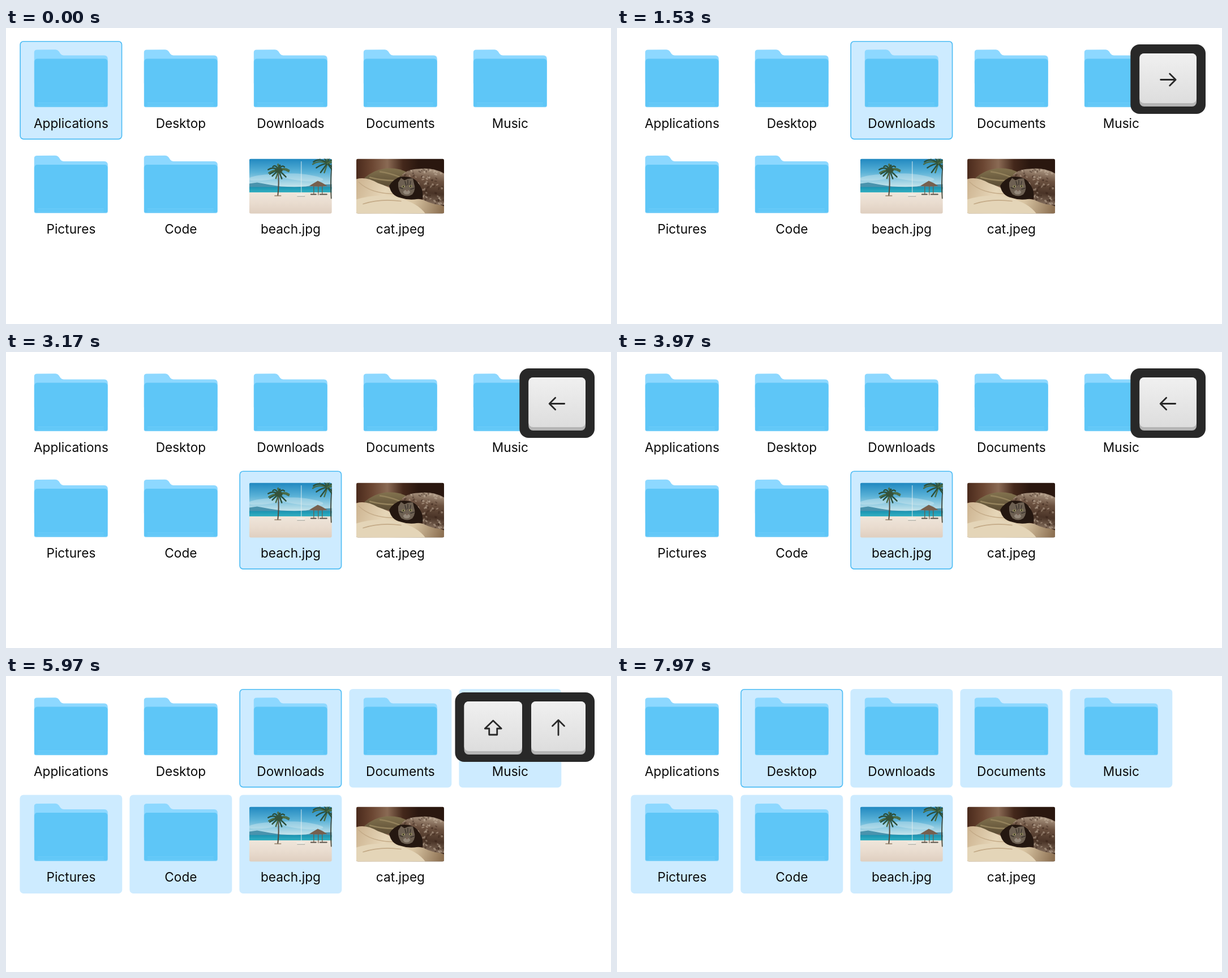
These frames come from a looping animation (1069x524 px, 8000 ms). An HTML page with a canvas:

```html
<!DOCTYPE html>
<html lang="en">
<head>
<meta charset="utf-8">
<title>File grid keyboard navigation</title>
<style>
  html, body { margin: 0; width: 100%; height: 100%; overflow: hidden; background: #fff; }
  canvas { display: block; width: 1069px; height: 524px; }
</style>
</head>
<body>
<canvas id="stage"></canvas>
<script>
const W = 1069, H = 524, LOOP = 8000;
const canvas = document.getElementById('stage');
const dpr = window.devicePixelRatio || 1;
canvas.width = W * dpr;
canvas.height = H * dpr;
const ctx = canvas.getContext('2d');

const COLS = 5, PITCH_X = 194, PITCH_Y = 187.5;
const names = ['Applications', 'Desktop', 'Downloads', 'Documents', 'Music',
  'Pictures', 'Code', 'beach.jpg', 'cat.jpeg'];

// Each step: start time, focused item, end of selection, keys on show
const steps = [
  [0, 0, 0, ''],
  [470, 1, 1, '→'],
  [1130, 2, 2, '→'],
  [1800, 3, 3, '→'],
  [2360, 8, 8, '↓'],
  [3030, 7, 7, '←'],
  [4500, 7, 7, '⇧'],
  [5400, 2, 7, '⇧↑'],
  [6270, 1, 7, '⇧←']
];
const FADE_START = 7200, FADE_TIME = 200;

function rounded(x, y, w, h, r, fill) {
  ctx.beginPath();
  ctx.roundRect(x, y, w, h, r);
  if (fill) {
    ctx.fillStyle = fill;
    ctx.fill();
  }
}

function shape(d, fill) {
  ctx.fillStyle = fill;
  ctx.fill(new Path2D(d));
}

function line(d, color, width) {
  ctx.strokeStyle = color;
  ctx.lineWidth = width;
  ctx.stroke(new Path2D(d));
}

function ellipse(x, y, rx, ry, fill, turn = 0) {
  ctx.beginPath();
  ctx.ellipse(x, y, rx, ry, turn, 0, Math.PI * 2);
  ctx.fillStyle = fill;
  ctx.fill();
}

function gradient(x0, y0, x1, y1, ...colors) {
  const g = ctx.createLinearGradient(x0, y0, x1, y1);
  colors.forEach((c, i) => g.addColorStop(i / (colors.length - 1), c));
  return g;
}

const vertical = (y0, y1, ...colors) => gradient(0, y0, 0, y1, ...colors);

function seeded(seed) {
  return () => (seed = (seed * 16807) % 2147483647) / 2147483647;
}

function at(x, y, draw) {
  ctx.save();
  ctx.translate(x, y);
  draw();
  ctx.restore();
}

function folder() {
  shape('M0 5Q0 .8 5 .6L37 .2Q41 0 43.5 3.2L46.5 7.8Q48.5 10.4 52 10.4H124' +
    'Q130 10.4 130 17V60H0Z', '#8dd8ff');
  rounded(0, 16.5, 130, 85.8, [5, 5, 3, 3], '#8ad5fa');
  rounded(0.4, 16.5, 129.2, 84.8, [5, 5, 3, 3], '#5ec6f7');
  ctx.fillStyle = 'rgba(150,220,252,.38)';
  ctx.fillRect(6, 94.3, 117, 1);
  ctx.fillRect(6, 98.2, 117, 1);
}

function palm(x, y, size, count, seed) {
  const rnd = seeded(seed);
  for (let i = 0; i < count; i++) {
    const a = i / count * Math.PI * 2 + rnd() * 0.4;
    const len = size * (0.75 + rnd() * 0.25);
    const ex = x + Math.cos(a) * len;
    const ey = y + Math.sin(a) * len * 0.6 + len * 0.15;
    const mx = x + Math.cos(a) * len * 0.55;
    const my = y + Math.sin(a) * len * 0.6 - len * 0.15;
    line(`M${x} ${y}Q${mx} ${my} ${ex} ${ey}`, i % 3 ? '#2c4f3a' : '#4a6b45', 2.4);
  }
}

function beach() {
  rounded(0, 0, 146, 97, 3.2);
  ctx.clip();
  ctx.fillStyle = vertical(0, 48, '#2088c0', '#5bb2d7', '#bfe1ea');
  ctx.fillRect(0, 0, 146, 52);
  ctx.globalAlpha = 0.35;
  ellipse(28, 33, 31, 5, '#e2f1f4', -0.1);
  ellipse(93, 33, 38, 6, '#e2f1f4', 0.1);
  ctx.globalAlpha = 1;
  shape('M0 44L14 42L36 46L56 49L80 50L100 49L118 46L146 45V54H0Z', '#4a93ad');
  ctx.fillStyle = vertical(50, 61, '#1a93b2', '#37b4c2');
  ctx.fillRect(0, 50, 146, 11);
  ctx.fillStyle = vertical(59.5, 97, '#efe6db', '#e9dccf', '#dfcfc0');
  ctx.fillRect(0, 59.5, 146, 38);
  // sailing boat
  line('M92 5V65', '#e8f1f1', 0.9);
  shape('M83 63H99L96 67H86Z', '#f3efe6');
  line('M85 66.5H98', '#8d8f88', 0.9);
  // palms
  line('M50.5 65Q53 45 51 21', '#554a3c', 2);
  palm(52, 20, 21, 13, 41);
  ellipse(52, 20, 7, 5, '#35523a');
  line('M145 70Q143 40 146 10', '#46483a', 1.8);
  palm(138, 8, 27, 13, 83);
  // thatched shade
  line('M122 45V64M114 47V62M129 47V62', '#6d5a48', 1.2);
  shape('M106 48Q116 42 121 39Q129 42 138 48Q122 50 106 48Z', '#77604e');
  line('M109 63H118M125 63H137', '#5a5249', 2);
  line('M45 65.5H56', '#94806a', 1.3);
}

function cat() {
  rounded(0, 0, 155, 97, 3.2);
  ctx.clip();
  ctx.fillStyle = gradient(0, 0, 110, 0, '#4a2a1c', '#6b4632', '#8a6a54', '#44281b', '#2a170f');
  ctx.fillRect(0, 0, 155, 97);
  // cushions and bed
  shape('M14 34Q30 20 52 17Q74 15 92 25L82 47Q57 51 38 45Z',
    vertical(16, 48, '#83734f', '#5d4e35'));
  line('M24 33Q50 40 78 38M42 23Q58 25 76 32', '#94825c', 2.4);
  shape('M0 36Q17 31 38 43Q56 49 76 60L100 70Q128 72 155 84V97H0Z',
    gradient(0, 40, 150, 97, '#cdb491', '#e6d6b8', '#d8c4a2', '#8d7153'));
  shape('M0 72Q38 60 74 69Q108 78 122 97H0Z', '#e4d5b8');
  line('M4 41Q25 62 68 62M12 80Q42 70 79 75', '#c4ab88', 1.6);
  // hollow under the blanket
  shape('M58 48Q64 36 82 30Q104 27 124 44L120 68Q98 76 78 69Q62 66 58 48Z', '#241710');
  // cat
  shape('M74 42L79 34L85 38Q92 34 100 35L102 44Q106 54 99 63' +
    'Q90 69 80 63Q73 55 74 42Z', '#6d6052');
  line('M86 40L88 47M91 38L91 46M96 40L95 46M77 51L82 53M102 52L96 54', '#3a332c', 1.4);
  ellipse(83, 49, 2.6, 1.9, '#a8a067');
  ellipse(96, 48.5, 2.6, 1.9, '#a8a067');
  ellipse(83, 49, 1, 1.6, '#171713');
  ellipse(96, 48.5, 1, 1.6, '#171713');
  ellipse(89, 59, 6, 4, '#94887a');
  shape('M87 55H92L89.5 58Z', '#745b4e');
  // woolly blanket
  ctx.save();
  ctx.clip(new Path2D('M78 32Q88 18 110 18Q136 15 155 26V82Q135 82 117 72' +
    'Q120 53 105 38Q94 30 78 32Z'));
  ctx.fillStyle = gradient(130, 16, 122, 82, '#b39f8a', '#6b5140', '#4a3427', '#8b7563');
  ctx.fillRect(75, 15, 80, 70);
  const rnd = seeded(719);
  for (let i = 0; i < 150; i++) {
    const x = 77 + rnd() * 79, y = 17 + rnd() * 65;
    const tuft = rnd() < 0.5 ? 'rgba(214,198,178,.4)' : 'rgba(50,32,22,.4)';
    ellipse(x, y, 1.5 + rnd() * 1.5, 1 + rnd(), tuft, rnd() * 3);
  }
  ctx.restore();
}

function items(step) {
  const [, focus, end] = step;
  ctx.font = '22.63px Inter, sans-serif';
  ctx.textAlign = 'center';
  ctx.textBaseline = 'alphabetic';
  names.forEach((name, i) => {
    at((i % COLS) * PITCH_X, Math.floor(i / COLS) * PITCH_Y, () => {
      if (i >= focus && i <= end) {
        rounded(24.4, 22.9, 180.9, 174.5, 6.5, '#cdebff');
        if (i === focus) {
          rounded(25.2, 23.7, 179.3, 172.9, 5.7);
          ctx.strokeStyle = '#4fbdf4';
          ctx.lineWidth = 1.6;
          ctx.stroke();
        }
      }
      if (i === 7) at(41.8, 44, beach);
      else if (i === 8) at(37, 44, cat);
      else at(49.8, 38, folder);
      ctx.fillStyle = '#0b0b0b';
      ctx.fillText(name, 114.9, 176.6);
    });
  });
}

const glyphs = {
  '→': 'M-13 0H13M3 -10.5L13.5 0L3 10.5',
  '←': 'M13 0H-13M-3 -10.5L-13.5 0L-3 10.5',
  '↓': 'M0 -12.5V13.5M-10.5 3.5L0 14L10.5 3.5',
  '↑': 'M0 13V-13M-10.5 -3L0 -13.5L10.5 -3',
  '⇧': 'M0 -12.5L14.5 1.5H7V12.5H-7V1.5H-14.5Z'
};
const keyWidth = { '→': 100.7, '←': 100.7, '↓': 96, '↑': 96, '⇧': 102.5 };
const GAP = 16, KEY_RIGHT = 1024;

function keycap(x, width, glyph) {
  rounded(x, 45, width, 94, 8, '#b5b5b5');
  rounded(x, 45, width, 88, 8, vertical(45, 133, '#f0f0f0', '#dddddd'));
  at(x + width / 2, 91.5, () => line(glyphs[glyph], '#282828', 2.8));
}

function overlay(keys, alpha) {
  if (!keys || alpha <= 0) return;
  const list = [...keys];
  const total = list.reduce((sum, k) => sum + keyWidth[k], GAP * (list.length - 1));
  let x = KEY_RIGHT - total;
  ctx.save();
  ctx.globalAlpha = alpha;
  rounded(x - GAP, 29, total + GAP * 2, 123, 16, '#282828');
  for (const key of list) {
    keycap(x, keyWidth[key], key);
    x += keyWidth[key] + GAP;
  }
  ctx.restore();
}

function draw(t) {
  const step = steps.findLast(s => t >= s[0]);
  ctx.setTransform(dpr, 0, 0, dpr, 0, 0);
  ctx.fillStyle = '#fff';
  ctx.fillRect(0, 0, W, H);
  ctx.lineCap = ctx.lineJoin = 'round';
  items(step);
  overlay(step[3], Math.min(1, 1 - (t - FADE_START) / FADE_TIME));
}

const start = performance.now();
function tick() {
  draw((performance.now() - start) % LOOP);
  requestAnimationFrame(tick);
}
tick();
</script>
</body>
</html>
```
